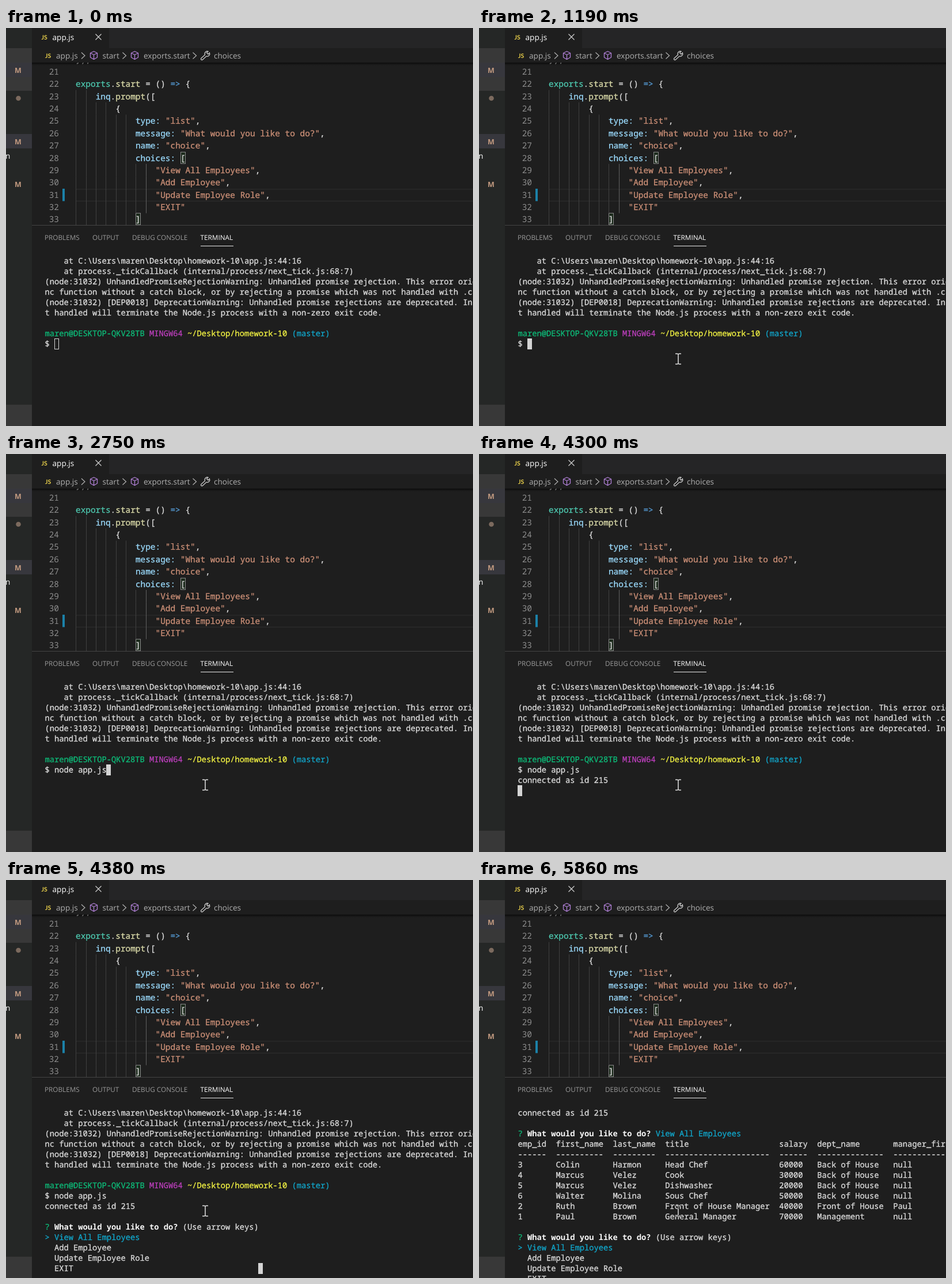
Animation of 811x691 px, one loop 8 s. Source, as an HTML page:

```html
<!DOCTYPE html>
<html lang="en">
<head>
<meta charset="utf-8">
<title>Terminal session</title>
<style>
html, body { margin: 0; width: 100%; height: 100%; overflow: hidden; background: #1e1e1e; }
svg { position: absolute; left: 0; top: 0; width: 811px; height: 691px; }
text { white-space: pre; text-rendering: geometricPrecision; }
.ui { font: 13.6px "Open Sans", "Noto Sans", sans-serif; fill: #b0b0b0; }
.panel { font-size: 11.75px; fill: #9a9a9a; }
.bright { fill: #fff; }
.js { font: bold 10.5px Lato, "Open Sans", sans-serif; fill: #e8cf4a; }
.mod { font: bold 12.5px "Open Sans", sans-serif; fill: #c29a80; text-anchor: middle; }
.code { font: 14.43px "Noto Sans Mono", "DejaVu Sans Mono", monospace; }
.term { font: 13.75px "Noto Sans Mono", "DejaVu Sans Mono", monospace; }
.num { fill: #8c8c8c; text-anchor: end; }
tspan { fill: currentColor; stroke: currentColor; stroke-width: .3; }
.w { color: #dedede; }
.b { color: #f8f8f8; font-weight: bold; stroke: none; }
.g { color: #0dbc79; }
.m { color: #bc3fbc; }
.y { color: #f5f543; }
.c { color: #11a8cd; }
.t { color: #4ec9b0; }
.f { color: #dcdcaa; }
.k { color: #569cd6; }
.p { color: #9cdcfe; }
.s { color: #ce9178; }
.line { fill: none; stroke: #b0b0b0; stroke-width: 1.2; }
.cube { fill: none; stroke: #b180d7; stroke-width: 1.3; stroke-linejoin: round; }
.match { fill: #1c2a1c; stroke: #888; }
#mouse { fill: none; stroke: #fff; stroke-width: 1.5; mix-blend-mode: difference; }
</style>
</head>
<body>
<svg viewBox="0 0 811 691">
  <defs>
    <linearGradient id="shade" x2="0" y2="1">
      <stop stop-color="#000" stop-opacity=".6"/><stop offset="1" stop-color="#000" stop-opacity="0"/>
    </linearGradient>
    <clipPath id="edit"><path d="M45 60H811V342H45z"/></clipPath>
    <path id="chev" class="line" d="M-3-5.5 3 0-3 5.5"/>
    <path id="cube" class="cube" d="M0-7 6-4V3.5L0 7-6 3.5V-4zM-6-4 0-1 6-4M0-1V7"/>
  </defs>
  <rect width="811" height="691" fill="#1e1e1e"/>

  <!-- side bar -->
  <rect width="45" height="691" fill="#252726"/>
  <path d="M0 35H45V109H0zM0 654H45V691H0z" fill="#383838"/>
  <path d="M0 60H45V85H0zM0 184H45V209H0z" fill="#37373d"/>
  <text class="mod" x="21" y="77.500">M</text>
  <text class="mod" x="21" y="201.500">M</text>
  <text class="mod" x="21" y="275.500">M</text>
  <circle cx="21.500" cy="122" r="4.300" fill="#7c6a5e"/>
  <text class="ui bright" x="-1" y="226.500">n</text>

  <!-- editor -->
  <g id="editor" clip-path="url(#edit)">
    <path d="M121 280H811M121 300.500H811" stroke="#2a2a2a" stroke-width="1.500"/>
    <rect x="98" y="279" width="4" height="21.500" fill="#1b81a8"/>
    <rect class="match" x="303.500" y="215.500" width="8" height="20"/>
    <rect class="match" x="225.500" y="321.500" width="8" height="20"/>
  </g>

  <!-- tabs and breadcrumb -->
  <rect x="179" width="632" height="35" fill="#252526"/>
  <rect x="45" y="60" width="766" height="5" fill="url(#shade)"/>
  <text class="js" x="61.500" y="19.500">JS</text>
  <text class="ui bright" x="80.500" y="21">app.js</text>
  <path class="line" style="stroke:#d0d0d0" d="M155.500 10.500 165.500 20.500M165.500 10.500 155.500 20.500"/>
  <text class="js" x="68" y="51.500">JS</text>
  <text class="ui" x="87" y="53">app.js</text>
  <text class="ui" x="167.500" y="53">start</text>
  <text class="ui" x="239" y="53">exports.start</text>
  <text class="ui" x="361" y="53">choices</text>
  <use href="#chev" x="134" y="48"/>
  <use href="#chev" x="205.500" y="48"/>
  <use href="#chev" x="327.500" y="48"/>
  <use href="#cube" x="152.500" y="47.500"/>
  <use href="#cube" x="223.500" y="47.500"/>
  <path class="line" style="stroke:#c5c5c5;stroke-width:1.3" d="M351 40.500a4.500 4.500 0 0 0-5.500 6L339 52.500a1.500 1.500 0 0 0 2.500 2.500L348 49a4.500 4.500 0 0 0 5.500-6L351 45.500 348.500 43z"/>

  <!-- panel -->
  <path d="M45 342.500H811" stroke="#454545"/>
  <text class="ui panel" x="67" y="368">PROBLEMS</text>
  <text class="ui panel" x="150" y="368">OUTPUT</text>
  <text class="ui panel" x="219" y="368">DEBUG CONSOLE</text>
  <text class="ui panel bright" x="337.500" y="368">TERMINAL</text>
  <path d="M338 378.500H395" stroke="#e7e7e7"/>
  <g id="term"></g>
  <rect id="caret" width="7" height="18" stroke="#d4d4d4"/>
  <path id="mouse" d="M-5-9H-1.500L0-8 1.500-9H5M0-8V8M-5 9H-1.500L0 8 1.500 9H5"/>
</svg>
<script>
const $ = id => document.getElementById(id);
const LOOP = 8000, COL = 8.25, ROW = 18, LEFT = 67.5, TOP = 395;

function add(parent, name, attrs, content = '') {
  const el = document.createElementNS('http://www.w3.org/2000/svg', name);
  for (const k in attrs) el.setAttribute(k, attrs[k]);
  el.textContent = content;
  return parent.appendChild(el);
}

// "§x" switches the following text to colour class x
function addLine(parent, cls, x, y, str) {
  const text = add(parent, 'text', { class: cls, x, y });
  ('w' + str).split('§').forEach(part => {
    if (part.length > 1) add(text, 'tspan', { class: part[0] }, part.slice(1));
  });
}

function drawEditor() {
  const box = $('editor'), pitch = 21.36, col = 8.66;
  const code = [
    [0, '});'],
    [0, ''],
    [0, '§texports§w.§fstart§w = () §k=>§w {'],
    [4, '§pinq§w.§fprompt§w(['],
    [8, '{'],
    [12, '§ptype:§w §s"list"§w,'],
    [12, '§pmessage:§w §s"What would you like to do?"§w,'],
    [12, '§pname:§w §s"choice"§w,'],
    [12, '§pchoices:§w ['],
    [16, '§s"View All Employees"§w,'],
    [16, '§s"Add Employee"§w,'],
    [16, '§s"Update Employee Role"§w,'],
    [16, '§s"EXIT"'],
    [12, ']']
  ];
  code.forEach(([indent, str], i) => {
    const y = 81 + (i - 1) * pitch;
    for (let c = 0; c < indent; c += 2) {
      add(box, 'rect', { x: Math.ceil(121 + c * col), y: y - 16, width: 1, height: pitch + .2,
        fill: c === 14 ? '#606060' : '#404040' });
    }
    if (i) add(box, 'text', { class: 'code num', x: 92, y }, 20 + i);
    addLine(box, 'code', 121 + indent * col, y, str);
  });
}

const ask = '§g?§b What would you like to do?§w ';
const menu = [ask + '(Use arrow keys)', '§c> View All Employees', '  Add Employee', '  Update Employee Role', '  EXIT'];
const shell = [
  '    at C:\\Users\\maren\\Desktop\\homework-10\\app.js:44:16',
  '    at process._tickCallback (internal/process/next_tick.js:68:7)',
  '(node:31032) UnhandledPromiseRejectionWarning: Unhandled promise rejection. This error originated',
  'nc function without a catch block, or by rejecting a promise which was not handled with .catch()',
  '(node:31032) [DEP0018] DeprecationWarning: Unhandled promise rejections are deprecated. In the',
  't handled will terminate the Node.js process with a non-zero exit code.',
  '',
  '§gmaren@DESKTOP-QKV28TB §mMINGW64 §y~/Desktop/homework-10 §c(master)'
];
const widths = [6, 10, 9, 22, 6, 14, 18];
const row = cells => cells.map((s, i) => s.padEnd(widths[i])).join('  ');
const table = [
  'emp_id|first_name|last_name|title|salary|dept_name|manager_first_name',
  widths.map(n => '-'.repeat(n)).join('|'),
  '3|Colin|Harmon|Head Chef|60000|Back of House|null',
  '4|Marcus|Velez|Cook|30000|Back of House|null',
  '5|Marcus|Velez|Dishwasher|20000|Back of House|null',
  '6|Walter|Molina|Sous Chef|50000|Back of House|null',
  '2|Ruth|Brown|Front of House Manager|40000|Front of House|Paul',
  '1|Paul|Brown|General Manager|70000|Management|null'
].map(s => row(s.split('|')));

const idle = [...shell, '$ '];
const typed = [...shell, '$ node app.js'];
const online = [...typed, 'connected as id 215', ''];
const listed = [...online, ask + '§cView All Employees', ...table, ''];

// start time, log, scrolled rows, caret column and log row
const screens = [
  { at: 0, log: idle, top: 0, caret: [2, 8], hollow: true },
  { at: 810, log: idle, top: 0, caret: [2, 8] },
  { at: 2750, log: typed, top: 0, caret: [13, 8] },
  { at: 3530, log: typed, top: 0, caret: [0, 9] },
  { at: 4300, log: online, top: 0, caret: [0, 10] },
  { at: 4380, log: [...online, ...menu], top: 0, caret: [45, 15] },
  { at: 5770, log: listed, top: 5, caret: [0, 21] },
  { at: 5860, log: [...listed, ...menu], top: 9 }
];
const moves = [
  { at: 0 },
  { at: 70, x: 633, y: 681 },
  { at: 125, x: 452, y: 612 },
  { at: 180, x: 339, y: 572 },
  { at: 810, x: 344, y: 574 },
  { at: 900, x: 339, y: 572 },
  { at: 1110, x: 343, y: 573 },
  { at: 1190, x: 346, y: 574.5 }
];
const current = (list, t) => list.filter(s => s.at <= t).pop();
const show = (el, on) => el.setAttribute('visibility', on ? 'visible' : 'hidden');

let shown;
function drawScreen(s) {
  if (s === shown) return;
  shown = s;
  const box = $('term'), caret = $('caret');
  box.textContent = '';
  s.log.slice(s.top).forEach((str, i) => addLine(box, 'term', LEFT, TOP + 13.5 + i * ROW, str));
  show(caret, s.caret);
  if (!s.caret) return;
  const [col, line] = s.caret;
  caret.setAttribute('x', Math.floor(LEFT + col * COL) + .5);
  caret.setAttribute('y', TOP + (line - s.top) * ROW + .5);
  caret.setAttribute('fill', s.hollow ? 'none' : '#d4d4d4');
}

function frame(now) {
  const t = now % LOOP, m = current(moves, t);
  drawScreen(current(screens, t));
  show($('mouse'), m.x);
  if (m.x) $('mouse').setAttribute('transform', `translate(${m.x} ${m.y})`);
}

drawEditor();
frame(0);
let start;
requestAnimationFrame(function tick(now) {
  start ??= now;
  frame(now - start);
  requestAnimationFrame(tick);
});
</script>
</body>
</html>
```
